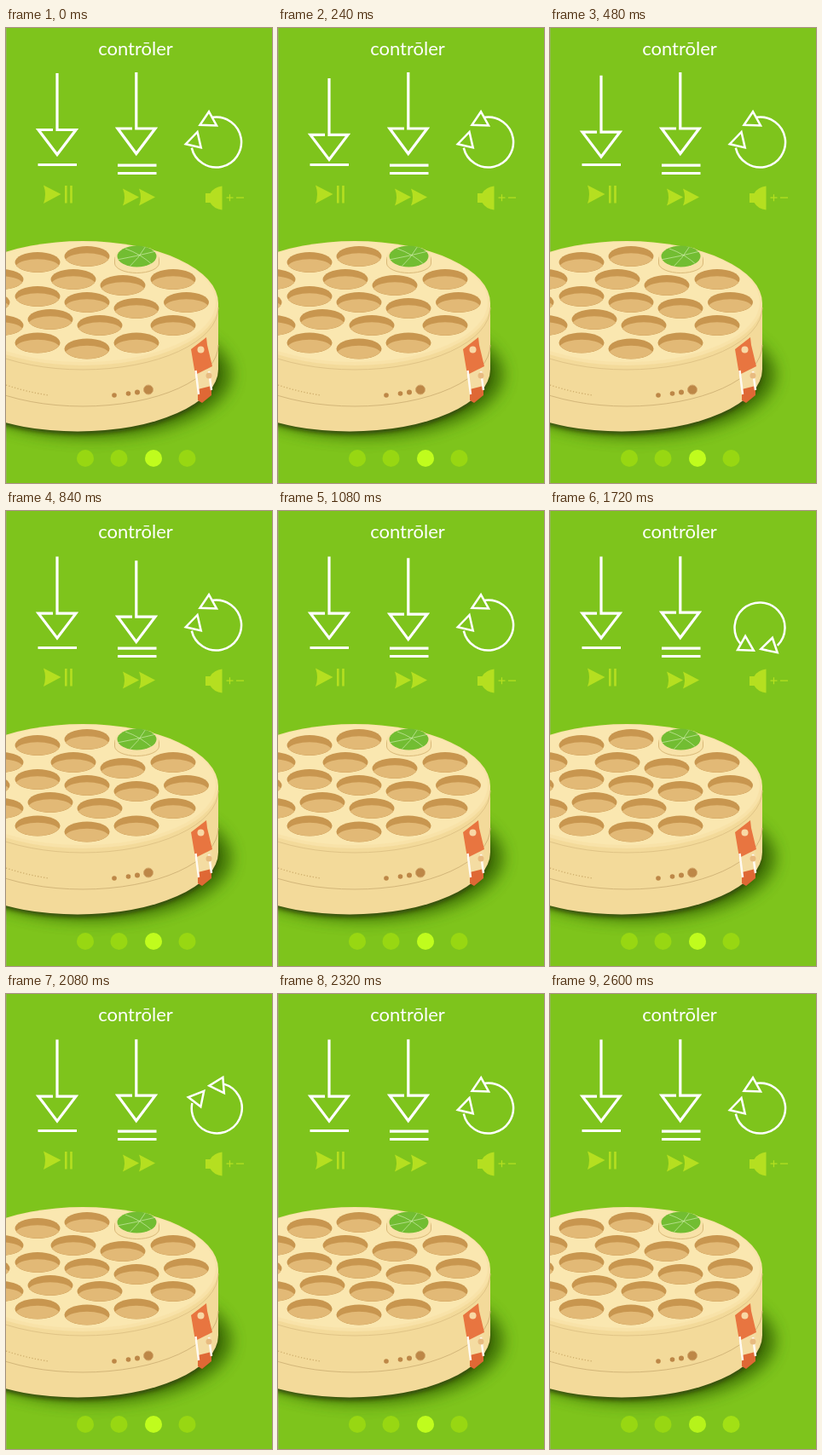
An HTML page for the animation above (2.64 s loop, 312 by 534 pixels).

```html
<!DOCTYPE html>
<html lang="en">
<head>
<meta charset="utf-8">
<title>Controls</title>
<style>
  html, body { margin: 0; width: 100%; height: 100%; overflow: hidden; background: #7ec41c; }
  svg { display: block; width: 100%; height: 100%; }
  .line { fill: none; stroke: #fff; stroke-width: 3.2; stroke-miterlimit: 10; }
  .icon { fill: #b5df20; }
  .title { font: 22px Lato, "Open Sans", sans-serif; fill: #fff; text-anchor: middle; }
</style>
</head>
<body>
<svg viewBox="0 0 312 534">
  <defs>
    <filter id="soft" x="-20%" y="-20%" width="140%" height="140%"><feGaussianBlur stdDeviation="9"/></filter>
    <filter id="tight" x="-20%" y="-20%" width="140%" height="140%"><feGaussianBlur stdDeviation="2.5"/></filter>
    <clipPath id="capClip"><ellipse cx="153.5" cy="268" rx="23" ry="12.5"/></clipPath>
  </defs>
  <rect width="312" height="534" fill="#7ec41c"/>
  <rect width="1" height="534" fill="#9ab86a" opacity=".6"/>
  <text class="title" x="152" y="31.5">contrōler</text>

  <!-- gestures -->
  <path id="tap" class="line" d="M60 53V119.5H82L60 148.5L38 119.5H55"/>
  <path class="line" d="M37.5 160.5H83"/>
  <path id="press" class="line" d="M152.800 52V118H175L152.800 147.500L131 118H148"/>
  <path class="line" d="M131 161.200H176.500M131 170.500H176.500"/>
  <path id="turn" class="line" style="stroke-width:2.5" d="M242.400 104.800A29.500 29.500 0 1 1 217.800 140.600M238 98.200L227.500 113.800L247 114.400ZM224.500 122L210.800 136.200L228.700 140.400Z"/>

  <!-- actions -->
  <g class="icon">
    <path d="M44 184.500L64.500 195L44 206Q48 195 44 184.500Z"/>
    <path d="M69 185h2.600v20.500h-2.600zM75.200 185h2.600v20.500h-2.600z"/>
    <path d="M137 188.500L156 198.500L137 208.500Q141 198.500 137 188.500Z"/>
    <path d="M156 188.500L175 198.500L156 208.500Q160 198.500 156 188.500Z"/>
    <path d="M234 194H239.500Q244 186.500 253.500 185.500V213.500Q244 212.500 239.500 205H234Z"/>
    <path d="M258.500 198.500h8v1.200h-8zM261.900 195.200h1.200v8h-1.200zM270 198.500h9v1.200h-9z"/>
  </g>

  <!-- pan -->
  <ellipse cx="100" cy="407" rx="164" ry="73" fill="#2f5a06" opacity=".8" filter="url(#soft)"/>
  <ellipse cx="85" cy="404" rx="164" ry="73" fill="#33420a" opacity=".8" filter="url(#tight)"/>
  <path d="M-81 323V400.500A165 73 0 0 0 249 400.500V323Z" fill="#f3da9a"/>
  <path d="M-69 372A159 72 0 0 0 249 372" fill="none" stroke="#d3b679"/>
  <ellipse cx="90" cy="323" rx="159" ry="73" fill="#f8e2a8"/>
  <path d="M-69 328A159 73 0 0 0 249 328" fill="none" stroke="#e0c486"/>
  <ellipse cx="90" cy="321.500" rx="156" ry="70.500" fill="#fae7b0"/>
  <path d="M0 419Q24 427 50 431" fill="none" stroke="#cfae6c" stroke-width="1.3" stroke-dasharray="1.3 2.2"/>
  <g id="holes"></g>

  <g fill="#f8e2a8" stroke="#d9b878">
    <path d="M127.500 269V276A26 11.500 0 0 0 179.500 276V269Z"/>
    <ellipse cx="153.500" cy="269.500" rx="26" ry="13.500" stroke="none"/>
  </g>
  <ellipse cx="153.500" cy="268" rx="23" ry="12.500" fill="#72bd32"/>
  <path clip-path="url(#capClip)" fill="none" stroke="#d7efb5" stroke-width=".8" opacity=".8" d="M130 272Q152 268 176 262M140 259Q158 265 173 279M143 282Q156 270 164 256"/>

  <g fill="#bd8747">
    <circle cx="127" cy="431" r="2.8"/>
    <circle cx="143.500" cy="429" r="2.8"/>
    <circle cx="154" cy="427.500" r="3"/>
    <circle cx="167" cy="424.500" r="5.500" stroke="#d3a769"/>
  </g>

  <!-- latch -->
  <path d="M224 405L241 398L243 420L228 430Z" fill="#f4dca2"/>
  <path d="M225 424L241 420L241 431L230 440L225 437Z" fill="#df6835"/>
  <path d="M217 377L235 363L236 372L242 397L222 407Z" fill="#e87540"/>
  <circle cx="228.500" cy="377.500" r="4" fill="#f8d8a5"/>
  <path d="M222.500 402L226 430M238 403L241 425" stroke="#fffaf0" stroke-width="2.500" fill="none"/>
  <circle cx="238" cy="408" r="3.500" fill="#e8bb80"/>

  <g id="dots"></g>
</svg>
<script>
const LOOP = 2640, STEP = 40;
const $ = id => document.getElementById(id);
const clamp = v => Math.min(1, Math.max(0, v));
const span = (t, a, b) => clamp((t - a) / (b - a));
const inOut = u => u < .5 ? 4 * u ** 3 : 1 - 4 * (1 - u) ** 3;

function add(parent, tag, attrs) {
  const el = document.createElementNS("http://www.w3.org/2000/svg", tag);
  for (const k in attrs) el.setAttribute(k, attrs[k]);
  return parent.appendChild(el);
}

// A dark well with its lit floor showing at the front.
function hole([x, y]) {
  const g = add($("holes"), "g", { transform: `translate(${x} ${y})` });
  add(g, "ellipse", { rx: 26.5, ry: 12, fill: "#c8964f" });
  add(g, "path", { d: "M-25.2 3.5A26.5 12 0 0 0 25.2 3.5A26.5 10.5 0 0 0 -25.2 3.5Z", fill: "#e2b976" });
}
[[37, 275], [95, 268], [-6, 295], [79, 295], [137, 302], [196, 295],
 [-22, 322], [37, 315], [95, 322], [153, 329], [211.5, 322], [-6, 349], [52, 342],
 [110, 349], [196, 349], [37, 369.5], [95, 376.5], [153, 369.5]].forEach(hole);

const dots = [93, 132.5, 173, 212.5].map(x => add($("dots"), "circle", { cx: x, cy: 505, r: 10 }));
const DIM = [152, 215, 18], LIT = [192, 252, 29];
const tint = k => `rgb(${DIM.map((v, i) => Math.round(v + (LIT[i] - v) * k))})`;

// One push down and back, resting a little lower than it began.
function push(id, t, start, rest) {
  const u = span(t, start, start + 600);
  const y = 6.3 * Math.sin(Math.PI * u) ** 2 + rest * u;
  $(id).setAttribute("transform", `translate(0 ${y.toFixed(2)})`);
}

function draw(t) {
  push("tap", t, 0, .6);
  push("press", t, 600, 1.2);
  // The pivot lies slightly off the ring's centre, so the ring wobbles.
  const angle = -360 * inOut(span(t, 1200, 2385));
  $("turn").setAttribute("transform", `rotate(${angle.toFixed(2)} 247.1 135.6)`);
  const k = span(t, 2570, 2690);
  [0, 0, 1 - k, k].forEach((v, i) => dots[i].setAttribute("fill", tint(v)));
}

const begin = performance.now();
function tick() {
  const t = (performance.now() - begin) % LOOP;
  draw(Math.floor(t / STEP) * STEP);
  requestAnimationFrame(tick);
}
draw(0);
requestAnimationFrame(tick);
</script>
</body>
</html>
```
